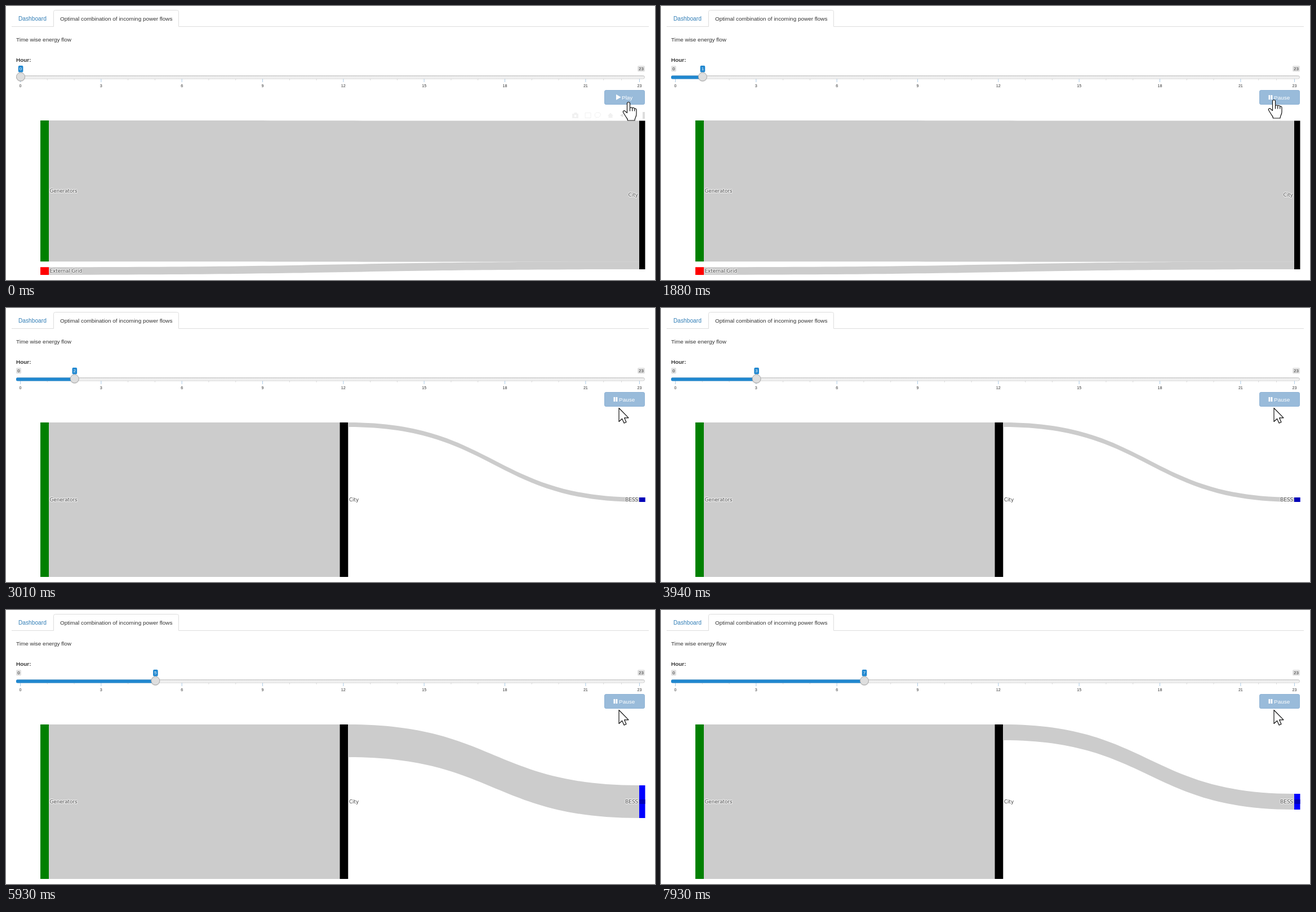
These frames come from a looping animation (1152x486 px, 8 s). An HTML page:

```html
<!DOCTYPE html>
<html lang="en">
<head>
<meta charset="utf-8">
<title>Power flows</title>
<style>
  html, body { margin: 0; width: 100%; height: 100%; overflow: hidden; background: #fff; }
  svg { display: block; width: 1152px; height: 486px; }
  text { font: 9.95px "Liberation Sans", Arial, sans-serif; fill: #333; }
  .tick { font-size: 7.2px; text-anchor: middle; }
  .badge { font-size: 8px; text-anchor: middle; }
  .node { font: 8.75px "DejaVu Sans", Verdana, sans-serif; fill: #444;
    text-shadow: .7px .7px 0 #fff, .7px -.7px 0 #fff, -.7px .7px 0 #fff, -.7px -.7px 0 #fff; }
  .end { text-anchor: end; }
  .white { fill: #fff; }
  .cursor { fill: #fff; stroke: #111; stroke-width: 1.2; stroke-linejoin: round; }
</style>
</head>
<body>
<svg viewBox="0 0 1152 486">
  <defs>
    <linearGradient id="groove" x2="0" y2="1">
      <stop stop-color="#ddd"/><stop offset="1" stop-color="#fff"/>
    </linearGradient>
  </defs>

  <path d="M10 36.5H84.5V10.5a3 3 0 0 1 3-3H303.5a3 3 0 0 1 3 3V36.5H1141" fill="none" stroke="#ddd"/>
  <text x="22" y="25.5" style="fill:#337fb7;font-size:10.2px">Dashboard</text>
  <text x="96" y="25.5">Optimal combination of incoming power flows</text>
  <text x="18" y="62.5">Time wise energy flow</text>
  <text x="18" y="98.5" font-weight="bold" style="font-weight:bold">Hour:</text>

  <g id="ticks"></g>
  <rect x="18.5" y="123.5" width="1115" height="5.5" rx="2.7" fill="url(#groove)" stroke="#ccc"/>
  <rect id="bar" x="18" y="123.5" height="6" rx="2" fill="#2087cf"/>
  <g id="minimum">
    <rect x="18" y="106" width="9" height="10.5" rx="2" fill="#e1e1e1"/>
    <text class="badge" x="22.5" y="114">0</text>
  </g>
  <rect x="1121" y="106" width="13" height="10.5" rx="2" fill="#e1e1e1"/>
  <text class="badge" x="1127.5" y="114">23</text>
  <g id="handle">
    <rect x="-4.2" y="105.8" width="8.6" height="11.6" rx="2" fill="#2087cf"/>
    <text id="value" class="badge white" y="114.3"></text>
    <circle cy="126.3" r="8" fill="#000" opacity=".13"/>
    <circle cy="125.5" r="7.5" fill="#dedede" stroke="#aaa"/>
  </g>

  <rect x="1062.5" y="149.5" width="71" height="25" rx="2.5" fill="#99bbda" stroke="#8fb3d5"/>
  <g id="play">
    <path class="white" d="M1083 156.8L1091.5 161.8 1083 166.8Z"/>
    <text class="white" x="1093" y="165.5">Play</text>
  </g>
  <g id="pause">
    <path class="white" d="M1078.5 158h2.8v8h-2.8zM1082.5 158h2.8v8h-2.8z"/>
    <text class="white" x="1088" y="165.5">Pause</text>
  </g>

  <g id="tools" fill="#f1f1f1">
    <path d="M1005 191h3l1-2h4l1 2h2v8h-11z"/>
    <circle cx="1010.5" cy="195" r="2" fill="#fff"/>
    <path d="M1028 189.500h10v9h-10zM1046 197q-3-8 4-8t5 5-7 3l-1 2" fill="none" stroke="#f1f1f1"/>
    <path d="M1068 194.500l5-5 5 5h-1.500v4h-7v-4z"/>
  </g>
  <path id="edgeTools" d="M1090 194l5-3v6zM1130 188h4v12h-4z" fill="#ddd"/>

  <g id="chart"></g>

  <g id="hand" class="cursor">
    <path d="M-2.500 19V2.500a2.500 2.500 0 0 1 5 0V11a2.300 2.300 0 0 1 4.200-.3 2.300 2.300 0 0 1 4 1 2.200 2.200 0 0 1 3.300 2V21q0 3-1.500 6t-1.500 5.500H-1.500q0-3-2.500-5.500l-5-8q-1.500-2.500 .3-3.500t3.700 1.500z"/>
    <path d="M2.500 11v5M6.700 11v5M10.700 12v4" fill="none"/>
  </g>
  <path id="arrow" class="cursor" d="M1088 177.500v24l5.600-5 3.400 7.600 4-1.600-3.400-7.700h7.400z"/>
</svg>

<script>
const $ = id => document.getElementById(id);
const LOOP = 8000, TOP = 203, BOTTOM = 477, MIDDLE = 340;
const hourTimes = [1880, 2940, 3940, 4930, 5930, 6920, 7930];
const chartTimes = [2010, 3010, 4000, 5000, 7000];
const storage = [0, 0, 8, 43, 58, 28];
const countPassed = (times, t) => times.filter(time => t >= time).length;
const show = (id, on) => $(id).style.display = on ? "" : "none";

const rect = (x, y, w, h, fill) =>
  `<rect x="${x}" y="${y}" width="${w}" height="${h}" fill="${fill}"/>`;
const label = (x, y, text, end) =>
  `<text class="node${end ? " end" : ""}" x="${x}" y="${y + 3}">${text}</text>`;

function link(x0, y0, x1, y1, h) {
  const mid = (x0 + x1) / 2;
  return `<path fill="#ccc" d="M${x0} ${y0}C${mid} ${y0} ${mid} ${y1} ${x1} ${y1}
    v${h}C${mid} ${y1 + h} ${mid} ${y0 + h} ${x0} ${y0 + h}z"/>`;
}

function chart(state) {
  if (state === 0) {
    return link(76, TOP, 1124, 203.6, 250.2) + link(76, 463.2, 1124, 453.4, 13.6)
      + rect(61, TOP, 15, 250.2, "green") + rect(61, 463.2, 15, 13.8, "red")
      + rect(1124, 203.5, 10.5, 263.5, "#000")
      + label(77.5, 328, "Generators") + label(77.5, 470, "External Grid")
      + label(1122, 335, "City", true);
  }
  const height = BOTTOM - TOP, stored = storage[state];
  const cityX = stored ? 592.5 : 1124, cityWidth = stored ? 14.8 : 10.5;
  let svg = link(76, TOP, cityX, TOP, height)
    + rect(61, TOP, 15, height, "green") + rect(cityX, TOP, cityWidth, height, "#000")
    + label(77.5, MIDDLE, "Generators");
  if (!stored) return svg + label(1122, MIDDLE, "City", true);
  const y = MIDDLE - stored / 2;
  return svg + link(607, TOP, 1124, y, stored) + rect(1124, y, 10.5, stored, "#00f")
    + rect(1124, 336, 10.5, 8, "#0000b8")
    + label(609, MIDDLE, "City") + label(1122, MIDDLE, "BESS", true);
}

function buildTicks() {
  const at = hour => 25.5 + hour * 47.78;
  const line = (hour, length, color) =>
    `<path d="M${at(hour)} 129v${length}" stroke="${color}"/>`;
  let svg = "";
  for (const hour of [0, 3, 6, 9, 12, 15, 18, 21, 23]) {
    svg += line(hour, 6, "#a9c9e4")
      + `<text class="tick" x="${at(hour)}" y="143.700">${hour}</text>`;
    const step = hour === 21 ? 2 / 3 : 1;
    if (hour < 23) svg += line(hour + step, 3, "#ddd") + line(hour + 2 * step, 3, "#ddd");
  }
  $("ticks").innerHTML = svg;
}

let shownChart = -1;
function draw(t) {
  const hour = countPassed(hourTimes, t), state = countPassed(chartTimes, t);
  const x = 26 + hour * 47.85;
  $("handle").setAttribute("transform", `translate(${x} 0)`);
  $("value").textContent = hour;
  $("bar").setAttribute("width", x - 18);
  show("bar", hour > 0);
  show("minimum", hour > 0);

  const paused = t < 810;
  show("play", paused);
  show("pause", !paused);
  show("tools", t < 1880);
  show("edgeTools", t < 70);

  const move = countPassed([70, 140, 210], t) / 3;
  $("hand").setAttribute("transform", `translate(${1105 - 17 * move} ${170.500 - 4 * move})`);
  show("hand", t < 2140);
  show("arrow", t >= 2140);

  if (state !== shownChart) {
    $("chart").innerHTML = chart(state);
    shownChart = state;
  }
}

buildTicks();
const start = performance.now();
function frame() {
  draw((performance.now() - start) % LOOP);
  requestAnimationFrame(frame);
}
frame();
</script>
</body>
</html>
```
